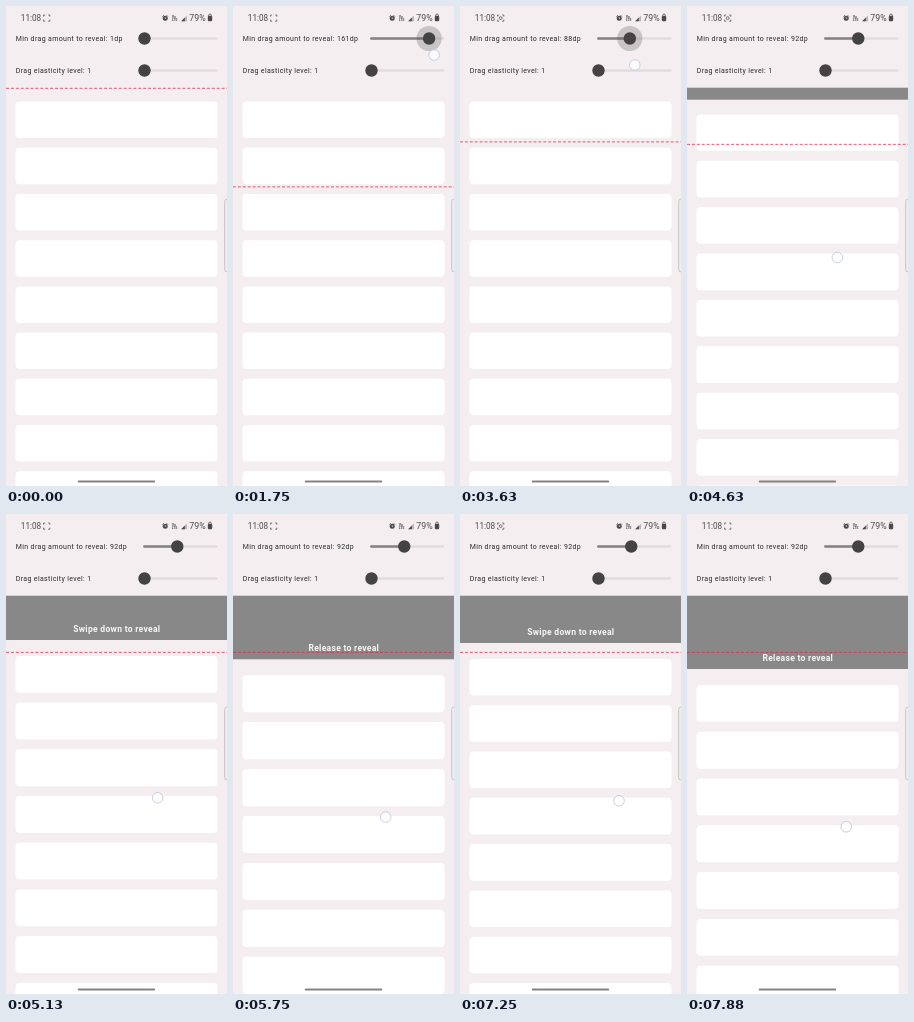
Animation of 221x480 px, one loop 8000 ms. Source, as an HTML page:

```html
<!DOCTYPE html>
<html lang="en">
<head>
<meta charset="utf-8">
<title>Swipe to reveal</title>
<style>
  html, body { margin: 0; width: 100%; height: 100%; overflow: hidden; background: #f4eef0; }
  svg { display: block; width: 100vw; height: 100vh; }
  text { font-family: Roboto, sans-serif; white-space: pre; }
  .label { font-size: 7px; letter-spacing: .35px; fill: #2a282a; }
  .hint { font-size: 8.6px; font-weight: 700; letter-spacing: .27px; fill: #f6f6f6; text-anchor: middle; }
  .status { fill: #4c494b; }
  .thin { fill: none; stroke: #555254; stroke-width: .8; }
</style>
</head>
<body>
<svg viewBox="0 0 221 480" preserveAspectRatio="none">
  <rect width="221" height="480" fill="#f4eef0"/>
  <g id="cards" fill="#fff"></g>
  <rect id="panel" y="81.7" width="221" height="0" fill="#888"/>
  <text id="hint" class="hint" x="110.8"></text>
  <path id="limit" d="M0 0H221" stroke="#e5243f" stroke-opacity=".75" stroke-dasharray="3 1.9"/>

  <g class="status">
    <text x="14.8" y="15" font-size="8.2">11:08</text>
    <text x="183.3" y="15" font-size="8.8">79%</text>
    <rect x="201.8" y="9.8" width="4.4" height="5.4" rx="1.2"/>
    <path d="M202.7 10V9.3a1.3 1.3 0 0 1 2.6 0V10" class="thin"/>
    <circle cx="159.2" cy="12.3" r="2.5"/>
    <path d="M156.4 10.6l1.5-1.5M162 10.6l-1.5-1.5" class="thin"/>
    <path d="M159.2 11v1.5h1" stroke="#f4eef0" stroke-width=".6" fill="none"/>
    <text x="165.8" y="11.8" font-size="3.5" font-weight="700">Vo</text>
    <text x="165.8" y="15.2" font-size="3.5" font-weight="700">LTE</text>
    <path d="M175.2 15.2L181 9.4V15.2Z" opacity=".35"/>
    <path d="M175.2 15.2L178.8 11.6V15.2Z"/>
    <path class="thin" d="M37.6 10.6V9H39.2M42.2 9H43.8V10.6M43.8 13.6V15.2H42.2M39.2 15.2H37.6V13.6"/>
    <circle id="scan" class="thin" cx="40.7" cy="12.1" r="1.4"/>
  </g>

  <text id="amount" class="label" x="9.8" y="35"></text>
  <text class="label" x="9.8" y="67">Drag elasticity level: 1</text>
  <g stroke-width="2.4" stroke-linecap="round">
    <path d="M138.3 32.5H210.3M138.3 64.5H210.3" stroke="#e2dcde"/>
    <path id="fill" stroke="#858284"/>
  </g>
  <circle id="ripple" cy="32.5" r="12.6" fill="#555" fill-opacity=".27"/>
  <circle id="thumb" cy="32.5" r="6.2" fill="#444243"/>
  <circle cx="138.5" cy="64.5" r="6.2" fill="#444243"/>

  <rect x="218.7" y="193" width="8" height="73" rx="2.5" fill="#f1edef" stroke="#bdb9bb" stroke-width=".8"/>
  <rect x="71.7" y="474.5" width="77.5" height="2" rx="1" fill="#858284"/>
  <circle id="touch" r="5.3" fill="#fff" fill-opacity=".75" stroke="#c3c8e0" stroke-width=".9"/>
</svg>
<script>
const LOOP = 8000, STEP = 125, TOP = 81.7;
const $ = id => document.getElementById(id);
const set = (el, attrs) => { for (const k in attrs) el.setAttribute(k, attrs[k]); };

// Tracks are [time, value] pairs joined by monotone cubic curves.
const dpTrack = [[875, 1], [1000, 8], [1400, 95], [1750, 161], [1950, 167], [2600, 87],
  [3050, 80], [3625, 88], [3950, 92]];
const sliderTouchY = [[1000, 38], [1750, 49], [2600, 57], [3625, 59], [4000, 59]];
const pullTrack = [[4375, 0], [4625, 12], [5125, 44.3], [5700, 62], [6200, 76], [6375, 74.3],
  [7050, 44], [7250, 47.3], [7875, 73.3]];
const pitchTrack = [[4375, 46.2], [5125, 46.7], [6375, 47.05], [7250, 46.3], [7875, 46.8]];
const pullTouchX = [[4500, 150], [5125, 151.7], [6375, 153.8], [7250, 159], [7875, 159.2]];

function sample(track, t) {
  const n = track.length - 1;
  if (t <= track[0][0]) return track[0][1];
  if (t >= track[n][0]) return track[n][1];
  const i = track.findIndex(p => p[0] > t) - 1;
  const secant = j => (track[j + 1][1] - track[j][1]) / (track[j + 1][0] - track[j][0]);
  const slope = j => {
    if (j === 0) return secant(0);
    if (j === n) return secant(n - 1);
    const a = secant(j - 1), b = secant(j);
    return a * b <= 0 ? 0 : 2 * a * b / (a + b);
  };
  const [t0, v0] = track[i], [t1, v1] = track[i + 1];
  const h = t1 - t0, u = (t - t0) / h, w = 1 - u;
  return v0 * w * w * (1 + 2 * u) + v1 * u * u * (3 - 2 * u)
    + h * u * w * (slope(i) * w - slope(i + 1) * u);
}

const cards = Array.from({ length: 9 }, () => {
  const card = document.createElementNS("http://www.w3.org/2000/svg", "rect");
  set(card, { x: 9.5, width: 202, rx: 4 });
  return $("cards").appendChild(card);
});

function draw(t) {
  const dp = Math.round(sample(dpTrack, t));
  const thumbX = 138.5 + .36 * (dp - 1);
  const limitY = 82.3 + .616 * (dp - 1);
  const pull = sample(pullTrack, t);
  const pitch = sample(pitchTrack, t);
  const sliding = t >= 1000 && t < 4000;
  const pulling = t >= 4500;
  const bottom = TOP + pull;

  $("amount").textContent = `Min drag amount to reveal: ${dp}dp`;
  set($("thumb"), { cx: thumbX });
  set($("ripple"), { cx: thumbX, visibility: sliding ? "visible" : "hidden" });
  set($("fill"), { d: `M138.3 32.5H${thumbX}` });
  set($("limit"), { transform: `translate(0 ${limitY})` });
  set($("scan"), { visibility: t % 1000 >= 250 && t % 1000 < 750 ? "visible" : "hidden" });

  const first = 95.6 + pull + 2 * Math.min(1, pull / 30);
  cards.forEach((card, i) => set(card, { y: first + i * pitch, height: pitch * .79 }));

  set($("panel"), { height: pull });
  $("hint").textContent = bottom >= limitY ? "Release to reveal" : "Swipe down to reveal";
  set($("hint"), { y: bottom - 8.3, visibility: pull > 20 ? "visible" : "hidden" });

  set($("touch"), {
    cx: sliding ? thumbX + 5 : sample(pullTouchX, t),
    cy: sliding ? sample(sliderTouchY, t) : 239.5 + pull,
    visibility: sliding || pulling ? "visible" : "hidden"
  });
}

const start = performance.now();
function tick() {
  const t = (performance.now() - start) % LOOP;
  draw(Math.floor(t / STEP) * STEP);
  requestAnimationFrame(tick);
}
tick();
</script>
</body>
</html>
```
